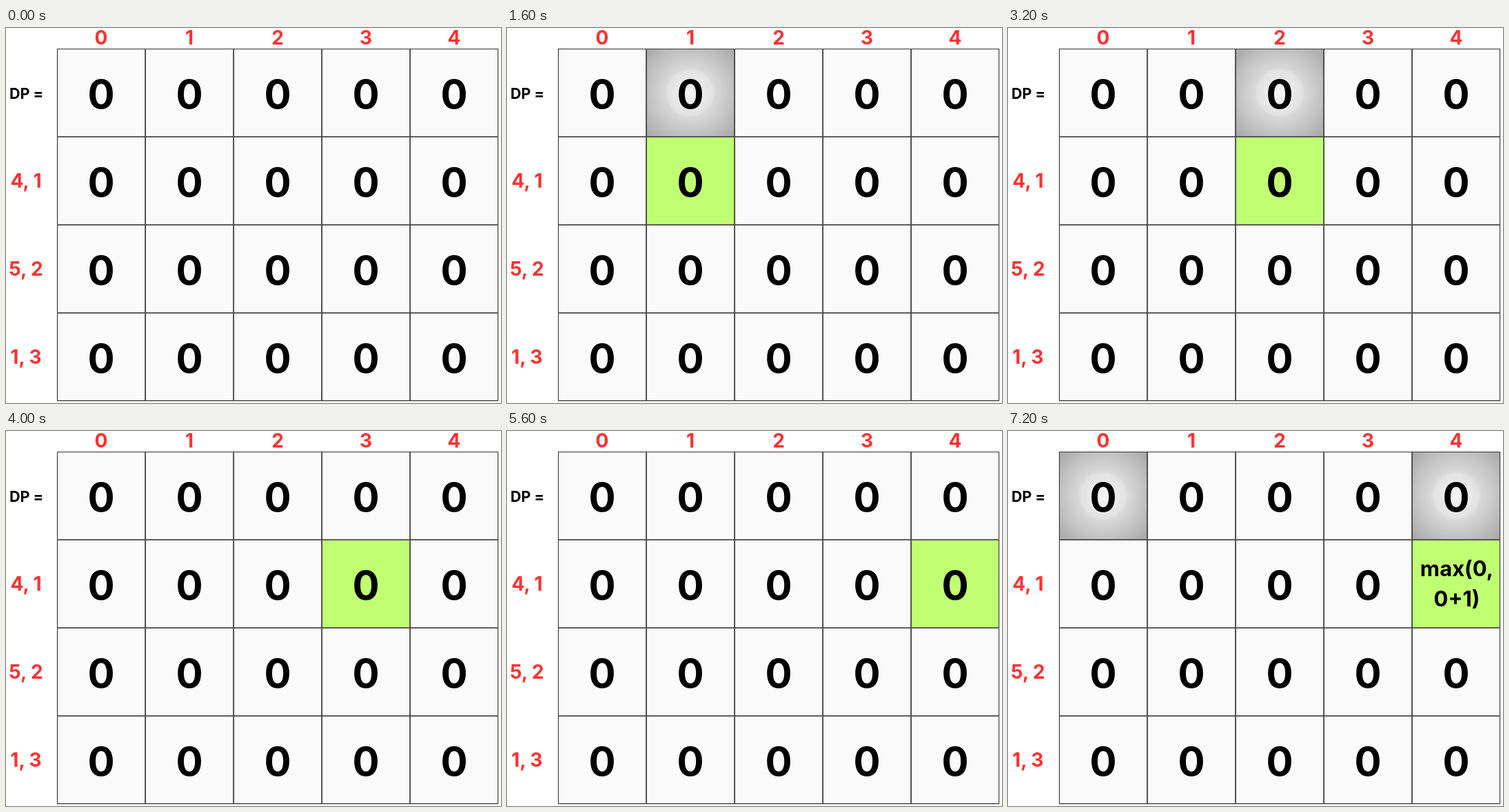
An HTML page for the animation above (8000 ms loop, 718 by 545 pixels).

```html
<!DOCTYPE html>
<html lang="en">
<head>
<meta charset="utf-8">
<title>DP table</title>
<style>
html, body { margin: 0; width: 100%; height: 100%; overflow: hidden; background: #fff; }
svg { display: block; }
text { font: 700 58px Inter, sans-serif; text-anchor: middle; }
.label { font-size: 28px; fill: #ff3131; }
.name { font-size: 21.5px; }
.formula { font-size: 31px; }
</style>
</head>
<body>
<svg id="stage" width="718" height="545" viewBox="0 0 718 545">
  <defs>
    <radialGradient id="grey" gradientUnits="objectBoundingBox" r="0.707">
      <stop offset="0" stop-color="#f4f4f4"/>
      <stop offset="0.36" stop-color="#e2e2e2"/>
      <stop offset="0.4" stop-color="#d8d8d8"/>
      <stop offset="0.7" stop-color="#c0c0c0"/>
      <stop offset="1" stop-color="#a6a6a6"/>
    </radialGradient>
  </defs>
</svg>
<script>
const STEP = 800, STEPS = 10, SIZE = 128, LEFT = 74, TOP = 30, COLS = 5, ROWS = 4;
const stage = document.getElementById("stage");
const colX = c => LEFT + c * SIZE;
const rowY = r => TOP + r * SIZE;

function add(tag, attrs, content = "") {
  const el = document.createElementNS("http://www.w3.org/2000/svg", tag);
  for (const key in attrs) el.setAttribute(key, attrs[key]);
  el.textContent = content;
  return stage.appendChild(el);
}

const cell = (c, r, fill) =>
  add("rect", { x: colX(c), y: rowY(r), width: SIZE, height: SIZE, fill });

const write = (content, x, y, cls = "") => add("text", { x, y, class: cls }, content);

// Visible from step `from` up to step `to`, with hard cuts.
function show(el, from, to) {
  const frames = [[0, from === 0], [from, true], [to, false], [STEPS, to === STEPS]]
    .filter(([at], i) => !(i === 1 && at === 0) && !(i === 2 && at === STEPS))
    .map(([at, on]) => ({ offset: at / STEPS, opacity: on ? 1 : 0, easing: "step-end" }));
  el.animate(frames, { duration: STEP * STEPS, iterations: Infinity });
}

for (let r = 0; r < ROWS; r++)
  for (let c = 0; c < COLS; c++) cell(c, r, "#fafafa");

// Each column is highlighted, then the value above it is looked up.
for (let c = 1; c < COLS; c++) {
  const from = 2 * c - 1, to = c === 4 ? STEPS : from + 2;
  show(cell(c, 1, "#c1ff72"), from, to);
  show(cell(c, 0, "url(#grey)"), from + 1, to);
}
show(cell(0, 0, "url(#grey)"), 9, STEPS);

function line(x1, y1, x2, y2, inner) {
  add("line", { x1, y1, x2, y2, stroke: inner ? "#484848" : "#333", "stroke-width": inner ? 1.9 : 1.1 });
}
for (let c = 0; c <= COLS; c++) {
  const inner = c > 0 && c < COLS, x = colX(c) + (inner ? 0.1 : c ? -0.4 : 0.5);
  line(x, TOP, x, rowY(ROWS), inner);
}
for (let r = 0; r <= ROWS; r++) {
  const inner = r > 0 && r < ROWS, y = rowY(r) + (inner ? 0.1 : r ? -0.4 : 0.5);
  line(LEFT, y, colX(COLS), y, inner);
}

for (let r = 0; r < ROWS; r++)
  for (let c = 0; c < COLS; c++) {
    const zero = write("0", colX(c) + 64, rowY(r) + 86.5);
    if (r === 1 && c === 4) show(zero, 0, 9);
  }

show(write("max(0,", 651, 211, "formula"), 9, STEPS);
show(write("0+1)", 651, 255, "formula"), 9, STEPS);

for (let c = 0; c < COLS; c++) write(c, colX(c) + 64, 24, "label");
["4, 1", "5, 2", "1, 3"].forEach((pair, i) => write(pair, 29, rowY(i + 1) + 74, "label"));
write("DP =", 29.5, 103, "name");
</script>
</body>
</html>
```
